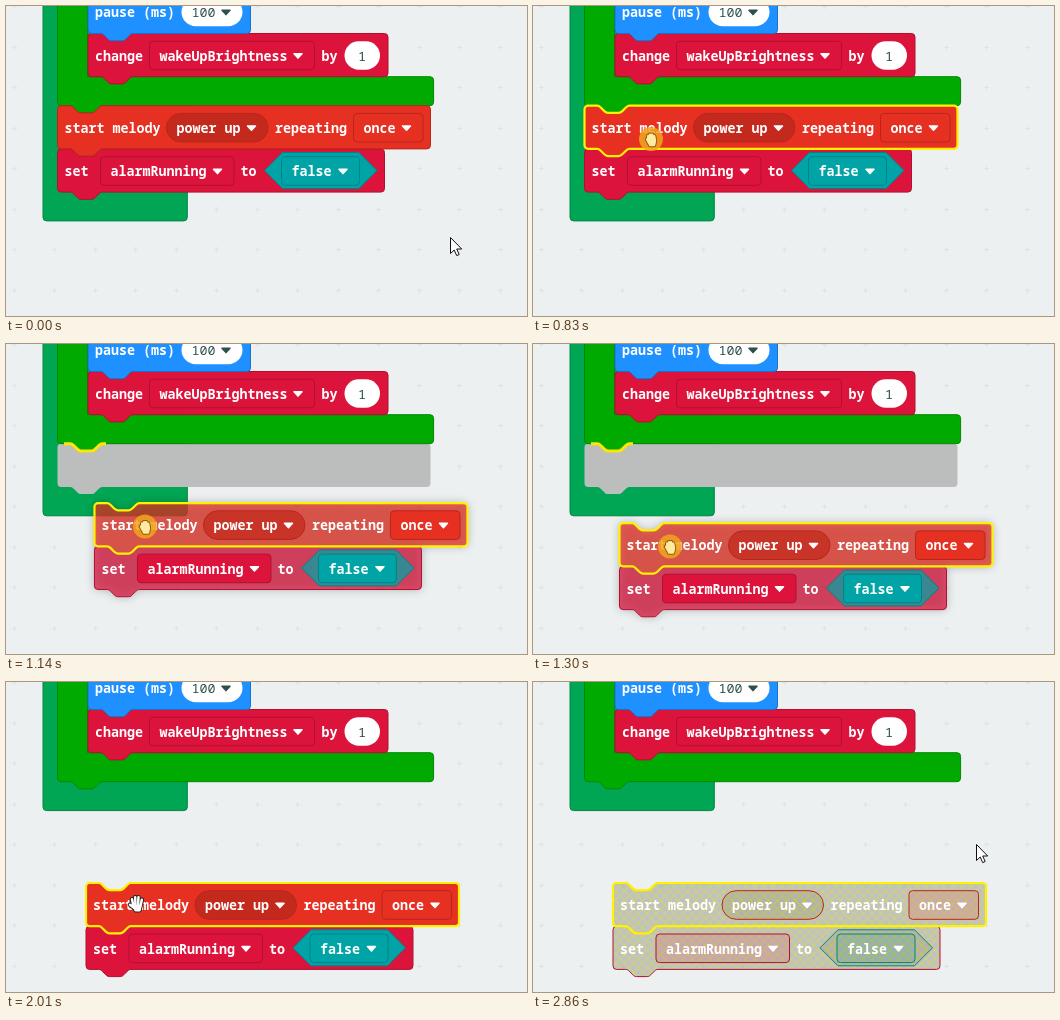
Animation of 521x310 px, one loop 3.55 s. Source, as an HTML page with a canvas:

```html
<!DOCTYPE html>
<html lang="en">
<head>
<meta charset="utf-8">
<title>Dragging blocks out of a stack</title>
<style>
  html, body { margin: 0; width: 100%; height: 100%; overflow: hidden; background: #ecf0f1; }
  canvas { display: block; }
</style>
</head>
<body>
<canvas id="stage" width="521" height="310"></canvas>
<script>
const ctx = document.getElementById('stage').getContext('2d');
const LOOP = 3550, ROW = 43.2;

// Bursts of activity: first step, last step, number of steps
const BURSTS = [[0, 0, 1], [70, 530, 7], [600, 680, 2], [830, 1300, 7], [1370, 1600, 4],
  [1770, 1840, 2], [2010, 2080, 2], [2250, 2710, 7], [2790, 2860, 2]];

// Pointer path: time, x, y
const POINTER = [[0, 444, 231], [70, 436, 229], [150, 400, 218], [300, 240, 166], [450, 102, 123],
  [530, 112, 131], [600, 117, 133], [830, 118, 133], [900, 125, 141], [990, 135.5, 157.5],
  [1140, 139, 182], [1300, 137, 202.5], [1370, 136, 209], [1530, 131.5, 223], [1770, 130.5, 222.5],
  [2170, 130.5, 222], [2250, 134, 226], [2330, 180, 227], [2480, 262, 206], [2710, 432, 163],
  [2790, 440, 162], [2860, 443, 162]];

const BLUE = '#1e90ff', RED = '#dc143c', GREEN = '#00aa00', JADE = '#00a654',
  MUSIC = '#e63022', MELODY = '#c4291d', TEAL = '#00a4a6', YELLOW = '#fff200', INK = '#2f4f4f';
const EDGE = { [BLUE]: '#1873cc', [RED]: '#b01030', [GREEN]: '#008800', [JADE]: '#008543',
  [MUSIC]: '#b8261b', [MELODY]: '#b8261b', [TEAL]: '#008385' };

const hatch = (() => {
  const tile = document.createElement('canvas');
  tile.width = tile.height = 9;
  const c = tile.getContext('2d');
  c.fillStyle = '#aaa';
  c.fillRect(0, 0, 9, 9);
  c.strokeStyle = '#cc0';
  c.stroke(new Path2D('M-1-1 10 10M10-1-1 10'));
  return ctx.createPattern(tile, 'repeat');
})();

function stepTime(t) {
  const [start, end, steps] = BURSTS.findLast(b => b[0] <= t);
  if (steps === 1) return start;
  const gap = (end - start) / (steps - 1);
  return start + gap * Math.min(steps - 1, Math.floor((t - start + 5) / gap));
}

function pointerAt(t) {
  const i = POINTER.findLastIndex(p => p[0] <= t);
  const a = POINTER[i], b = POINTER[i + 1] || a;
  const k = b === a ? 0 : (t - a[0]) / (b[0] - a[0]);
  return [a[1] + (b[1] - a[1]) * k, a[2] + (b[2] - a[2]) * k];
}

// Connector outline, drawn rightwards (s = 1) or leftwards (s = -1)
const notch = s => `c${1.8 * s},0 ${2.7 * s},.9 ${3.6 * s},1.8 l${3.6 * s},3.6
  c${.9 * s},.9 ${1.8 * s},1.8 ${3.6 * s},1.8 h${10.8 * s}
  c${1.8 * s},0 ${2.7 * s},-.9 ${3.6 * s},-1.8 l${3.6 * s},-3.6
  c${.9 * s},-.9 ${1.8 * s},-1.8 ${3.6 * s},-1.8`;
const bottomEdge = (x, y) => `a3.6 3.6 0 0 1-3.6 3.6H${x + 45}${notch(-1)}H${x + 3.6}a3.6 3.6 0 0 1-3.6-3.6`;

const blockPath = (x, y, w) => new Path2D(`M${x},${y + 3.6}a3.6 3.6 0 0 1 3.6-3.6H${x + 12.6}${notch(1)}
  H${x + w - 3.6}a3.6 3.6 0 0 1 3.6 3.6v${ROW - 7.2}${bottomEdge(x, y)}z`);

function pillPath(x, y, w, h, r) {
  const path = new Path2D();
  path.roundRect(x, y, w, h, r);
  return path;
}

const LOOP_BLOCK = new Path2D(`M81.5-20V70.7H424a3.6 3.6 0 0 1 3.6 3.6V96.1${bottomEdge(51.5, 99.7)}V-20z`);
const MUSIC_BLOCK = blockPath(51.5, 99.7, 373);
const SET_BLOCK = blockPath(51.5, 142.9, 327);
const HEXAGON = new Path2D('M258.5 164.5l18-18h76.500l18 18-18 18h-76.500z');

function paint(path, color, mode) {
  ctx.globalAlpha = { solid: 1, drag: .72, off: .65 }[mode];
  ctx.fillStyle = mode === 'off' ? hatch : color;
  ctx.fill(path);
  ctx.globalAlpha = 1;
  outline(path, EDGE[color], 1);
}

function outline(path, color, width) {
  ctx.strokeStyle = color;
  ctx.lineWidth = width;
  ctx.stroke(path);
}

function text(label, x, mid, color = '#fff') {
  ctx.font = `${color === INK ? 500 : 'bold'} 13.33px "Noto Sans Mono", monospace`;
  ctx.fillStyle = color;
  ctx.fillText(label, x, mid + 5.2);
}

function optionText(label, x, mid, w, color = '#fff') {
  text(label, x + 10, mid, color);
  const arrow = new Path2D(`M${x + w - 20.5},${mid - 1.8}h8l-4 4.400z`);
  ctx.fill(arrow);
  ctx.lineJoin = 'round';
  outline(arrow, color, 1.5);
}

function dropdown(label, x, mid, w, color, mode) {
  const box = pillPath(x, mid - 14.3, w, 28.6, 3.6);
  ctx.globalAlpha = mode === 'off' ? .15 : 1;
  ctx.fillStyle = color;
  ctx.fill(box);
  ctx.globalAlpha = 1;
  outline(box, EDGE[color], 1);
  optionText(label, x, mid, w);
}

function whitePill(x, mid, w) {
  ctx.fillStyle = '#fff';
  ctx.fill(pillPath(x, mid - 14.2, w, 28.4, 14.2));
}

function drawGrid() {
  ctx.fillStyle = '#ecf0f1';
  ctx.fillRect(0, 0, 521, 310);
  const marks = new Path2D();
  for (let x = 8; x < 521; x += 40.5)
    for (let y = .5; y < 310; y += 40.5) {
      const px = Math.floor(x) + .5, py = Math.floor(y) + .5;
      marks.addPath(new Path2D(`M${px - 2.5} ${py}h5M${px} ${py - 2.5}v5`));
    }
  outline(marks, '#dfe3e4', 1);
}

function drawStack(bottom, showSlot) {
  paint(pillPath(37, -20, 144.3, bottom + 20, 3.6), JADE, 'solid');
  if (showSlot) {
    ctx.fillStyle = '#bcbdbd';
    ctx.fill(MUSIC_BLOCK);
  }
  paint(LOOP_BLOCK, GREEN, 'solid');
  if (showSlot) outline(new Path2D(`M58 99.7H64.1${notch(1)}h3.500`), '#ffe600', 3);

  paint(blockPath(82, 27.5, 300), RED, 'solid');
  text('change', 89, 49.5);
  dropdown('wakeUpBrightness', 143.5, 49.5, 165, RED);
  text('by', 315.5, 49.5);
  whitePill(338.5, 49.5, 35.5);
  text('1', 352, 49.5, INK);

  paint(blockPath(82, -15.7, 162.5), BLUE, 'solid');
  text('pause (ms)', 89, 6);
  whitePill(175.5, 6, 61);
  optionText('100', 175.5, 6, 61, INK);
}

function drawShadow() {
  ctx.save();
  ctx.shadowColor = 'rgba(0,0,0,.27)';
  ctx.shadowBlur = 10;
  ctx.shadowOffsetX = 2000;
  ctx.translate(-2000, 0);
  const both = new Path2D(MUSIC_BLOCK);
  both.addPath(SET_BLOCK);
  ctx.fillStyle = '#000';
  ctx.fill(both);
  ctx.restore();
}

function drawPair(dx, dy, mode, selected) {
  ctx.save();
  ctx.translate(dx, dy);
  if (mode === 'drag') drawShadow();

  paint(SET_BLOCK, RED, mode);
  text('set', 58.5, 165);
  dropdown('alarmRunning', 94.5, 165, 133.5, RED, mode);
  text('to', 234.5, 165);
  paint(HEXAGON, TEAL, mode);
  dropdown('false', 275.5, 165, 78, TEAL, mode);

  paint(MUSIC_BLOCK, MUSIC, mode);
  if (selected) outline(MUSIC_BLOCK, YELLOW, 2.2);
  text('start melody', 58.5, 121.7);
  paint(pillPath(160.5, 107.4, 101.5, 28.6, 14.3), MELODY, mode);
  optionText('power up', 160.5, 121.7, 101.5);
  text('repeating', 269, 121.7);
  dropdown('once', 347.5, 121.7, 69.5, MUSIC, mode);
  ctx.restore();
}

function drawHand(pressed) {
  if (pressed) {
    ctx.fillStyle = 'rgba(242,165,28,.85)';
    ctx.beginPath();
    ctx.arc(0, 0, 12, 0, 7);
    ctx.fill();
  }
  const reach = pressed ? .6 : 1;
  const fingers = [[-3, -4.5, -5], [-1, -1.3, -7], [1.5, 2, -7], [4, 5.3, -4.5]]
    .map(([x, tipX, tipY]) => `M${x} 2L${tipX * reach} ${tipY * reach}`).join('');
  const hand = new Path2D(`${fingers}M-2 4L${-6.5 * reach} ${.5 * reach}M-2 2H4L3 6H-1z`);
  const skin = pressed ? '#ffeaa0' : '#fff';
  ctx.lineCap = ctx.lineJoin = 'round';
  outline(hand, pressed ? '#8a5a10' : '#222', 4.4);
  outline(hand, skin, 2.5);
  ctx.fillStyle = skin;
  ctx.fill(hand);
  ctx.lineCap = 'butt';
}

function drawArrow() {
  const arrow = new Path2D('M.5.5V16.500l3.700-3.500 2.500 5.600 2.500-1.100-2.500-5.500h5z');
  ctx.fillStyle = '#fff';
  ctx.fill(arrow);
  ctx.lineJoin = 'miter';
  outline(arrow, '#111', 1);
}

function draw(now) {
  const t = stepTime(now % LOOP);
  const [x, y] = pointerAt(t);
  const dragging = t >= 900 && t < 2010;
  const showSlot = t >= 900 && t < 1450;
  const mode = dragging ? 'drag' : t >= 2080 ? 'off' : 'solid';
  let dx = 0, dy = 0;
  if (t >= 1770) [dx, dy] = [28.5, 101.3];
  else if (dragging) [dx, dy] = [x - 102, y - 123];

  drawGrid();
  drawStack(t < 900 ? 214.9 : showSlot ? 171.8 : 128.6, showSlot);
  drawPair(dx, dy, mode, t >= 600);

  ctx.save();
  ctx.translate(x, y);
  const overBlock = t < 600 ? y < 186 : t < 2250 || y > 203;
  if (overBlock) drawHand(t >= 680 && t < 1840);
  else drawArrow();
  ctx.restore();
  requestAnimationFrame(() => draw(performance.now() - began));
}

const began = performance.now();
draw(0);
</script>
</body>
</html>
```
